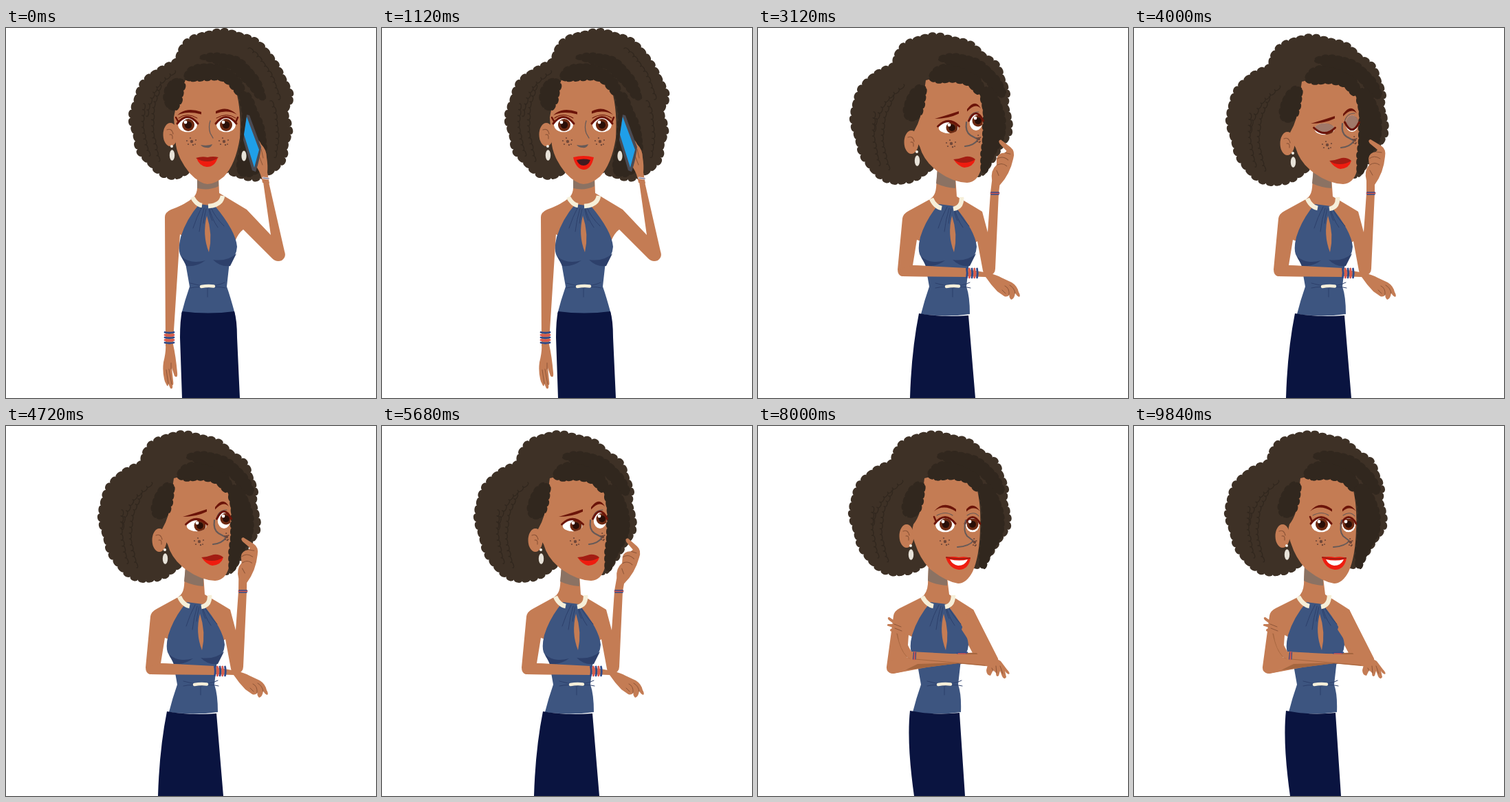
These frames come from a looping animation (538x538 px, 10 s). An HTML page:

```html
<!DOCTYPE html>
<html lang="en">
<head>
<meta charset="utf-8">
<title>Phone, think, smile</title>
<style>
html, body { margin: 0; width: 100%; height: 100%; overflow: hidden; background: #fff; }
svg { display: block; width: 100%; height: 100%; }
</style>
</head>
<body>
<svg id="stage" viewBox="0 0 538 538"></svg>
<script>
const NS = 'http://www.w3.org/2000/svg';
const C = {
  hair: '#3e3126', lock: '#31271e', skin: '#c47c54', crease: '#8d5538', shade: '#a5663f',
  dress: '#3d5580', fold: '#2d406b', skirt: '#0a1440', cream: '#f6efd9', gray: '#8b7263',
  brow: '#6b1409', iris: '#6d2a12', lid: '#a0796a', lip: '#ef1c0f', lipDark: '#a31d13',
  nose: '#665a58', pearl: '#e7e2d8', blue: '#2f4a8a', coral: '#d9564c'
};

// Shape helpers, each returning markup
const fill = (color, d) => `<path d="${d}" fill="${color}"/>`;
const line = (color, w, d) =>
  `<path d="${d}" fill="none" stroke="${color}" stroke-width="${w}" stroke-linecap="round" stroke-linejoin="round"/>`;
const dot = (color, x, y, rx, ry = rx) =>
  `<ellipse cx="${x}" cy="${y}" rx="${rx}" ry="${ry}" fill="${color}"/>`;
const group = (attrs, ...parts) => `<g ${attrs}>${parts.join('')}</g>`;

// Closed Catmull-Rom curve, always clockwise
function smooth(text) {
  const p = text.split(' ').map(s => s.split(',').map(Number));
  const n = p.length, at = i => p[(i + n) % n];
  const area = p.reduce((s, [x, y], i) => s + x * at(i + 1)[1] - at(i + 1)[0] * y, 0);
  if (area < 0) p.reverse();
  let d = 'M' + p[0];
  for (let i = 0; i < n; i++) {
    const [a, b, c, e] = [at(i - 1), at(i), at(i + 1), at(i + 2)];
    d += `C${b[0] + (c[0] - a[0]) / 6} ${b[1] + (c[1] - a[1]) / 6} ` +
         `${c[0] - (e[0] - b[0]) / 6} ${c[1] - (e[1] - b[1]) / 6} ${c}`;
  }
  return d;
}

// Rounded lobes along the left-hand side of a path
function lobes(d, step, height) {
  const path = document.createElementNS(NS, 'path');
  path.setAttribute('d', d);
  const len = path.getTotalLength(), n = Math.round(len / step);
  let a = path.getPointAtLength(0), out = `M${a.x} ${a.y}`;
  for (let i = 1; i <= n; i++) {
    const b = path.getPointAtLength(len * i / n);
    const k = height * (0.8 + 0.4 * Math.sin(i * 2.4) ** 2);
    const dx = b.x - a.x, dy = b.y - a.y;
    out += 'C' + [a.x + dy * k - dx * 0.15, a.y - dx * k - dy * 0.15,
      b.x + dy * k + dx * 0.3, b.y - dx * k + dy * 0.3, b.x, b.y].map(v => v.toFixed(1)).join(' ');
    a = b;
  }
  return out;
}
const mane = pts => fill(C.hair, lobes(smooth(pts), 11.5, 0.6));
const lock = pts => fill(C.lock, lobes(smooth(pts), 10, 0.45));
const strand = d => line(C.lock, 1.3, lobes(d, 9, 0.5));

// Face parts
const eyes = [];
function eye(x, y, rx, ry, ix, iy, r = 9) {
  const id = 'eye' + eyes.length;
  eyes.push({ id, x, y, rx, ry });
  return `<clipPath id="${id}c"><ellipse cx="${x}" cy="${y}" rx="${rx}" ry="${ry}"/></clipPath>` +
    group(`clip-path="url(#${id}c)"`,
      dot('#fff', x, y, rx, ry), dot(C.iris, ix, iy, r), dot('#2a0f08', ix, iy, r * 0.58),
      dot('#fff', ix - 4, iy - 4, 2.4), `<path id="${id}l" fill="${C.lid}"/>`) +
    `<path id="${id}s" fill="none" stroke="${C.brow}" stroke-width="3" stroke-linecap="round"/>`;
}
function setEye(i, shut) {
  const { id, x, y, rx, ry } = eyes[i];
  const arc = `${x - rx - 1} ${y - 2}Q${x} ${y - 2 + ry * 1.8 * (2 * shut - 1)} ${x + rx + 1} ${y - 2}`;
  document.getElementById(id + 's').setAttribute('d', 'M' + arc);
  document.getElementById(id + 'l').setAttribute('d', `M${arc}V${y - 30}H${x - rx - 1}Z`);
}
const brow = (x1, y1, cx, cy, x2, y2) =>
  fill(C.brow, `M${x1} ${y1}Q${cx} ${cy - 2} ${x2} ${y2}l0 3.5Q${cx} ${cy + 4} ${x1} ${y1}Z`);
const freckles = (x, y, s = 1) =>
  [[0, 0, 2.2], [-7, -1, 1.1], [-5, 4, 1.1], [-2, -5, 1.1], [2, 5, 1.2], [6, -2, 1.1], [5, 4, 1]]
    .map(([a, b, r]) => dot('#70483a', x + a * s, y + b, r)).join('');
const earring = (x, y) => dot('#f3efe6', x, y, 2) + dot(C.pearl, x + 0.5, y + 13, 3.7, 7.8);
const ear = (x, y) => dot(C.skin, x, y, 10.5, 17) +
  line(C.crease, 1.2, `M${x - 5} ${y - 7}q7 -3 9 6m-5 1q5 -1 4 6`);

// Dress shared by every pose; details sit slightly off when turned
function dress(dx, shift, hem) {
  return group(`transform="translate(${dx} 0)"`,
    fill(C.dress, `M281 256Q262 278 254 304Q250 320 253 329Q256 336 261 342L267 376Q260 396 255 416
      Q290 421 ${hem} 416Q326 390 321 376L325 340Q335 332 336 318Q334 295 304 259Z`),
    fill(C.fold, 'M255 332Q268 344 290 338Q276 348 262 346ZM335 328Q322 340 301 337Q312 348 326 346Z'),
    group(`transform="translate(${shift} 0)"`,
      line(C.fold, 1, `M285 260Q277 275 272 291M288 262Q283 278 281 296M291 263Q288 274 287 284
        M298 261Q304 275 317 288M296 263Q299 277 308 290M295 264Q297 275 300 280`),
      fill(C.skin, 'M292 273Q285 301 295 326Q301 300 292 273Z'),
      line(C.fold, 1, 'M268 371Q280 375 293 375Q308 375 318 370M268 378Q282 375 293 378Q308 375 319 378M293 379V391'),
      line(C.cream, 4.5, 'M284 376Q293 374.5 302 375.5')));
}
const collar = d => line(C.cream, 6.5, d).replaceAll('round', 'butt');
const bangles = (x, y, turn) => group(`transform="translate(${x} ${y}) rotate(${turn})"`,
  ...[-7.5, -3.7, 0, 3.7, 7.5].map((v, i) => line(i % 2 ? C.coral : C.blue, 2.8, `M-6.5 ${v}Q0 ${v + 1.5} 6.5 ${v}`)));

// Pose 1: on the phone
function phonePose() {
  const back = group('class="headA"',
    mane(`246,217 222,208 206,193 194,178 190,160 184,140 184,124 189,106 198,84 209,70 228,59 247,51 251,38 262,22
      282,11 305,7 325,6 347,13 368,23 383,39 390,52 402,70 409,86 414,104 406,120 410,140 412,155 406,170 404,188
      393,203 378,213 360,218 340,215 325,208 292,190 264,208`.replace(/\s+/g, ' ')),
    strand('M246 62Q208 82 204 128'), strand('M224 82Q200 132 222 194'), strand('M200 110Q192 150 208 186'),
    strand('M352 30Q386 58 396 104'), strand('M384 106Q398 140 390 188'));
  const body = [
    fill(C.skin, `M278 215H309L310 240Q330 252 350 264L385 301L374 224H382L405 325Q408 333 401 338Q393 341 387 335
      L345 293Q338 298 333 310L300 330L253 300L244 440L243 462H232L231 275Q231 268 240 264Q262 256 273 246Q278 240 278 232Z`),
    fill(C.gray, 'M278 218H309V230Q295 237 278 233Z'),
    fill(C.skin, `M232 460Q233 470 229 486Q227 500 231 514L234 520Q236 522 236 517L239 524Q243 526 242 519
      Q244 520 243 513L241 494L245 506Q250 510 249 501Q247 478 243 460Z`),
    line(C.crease, 1, 'M233 497L236 517M237 496L241 518M240 487V496'),
    dress(0, 0, 333), collar('M271 246Q277 257 285 258M294 259Q313 258 315 244'),
    fill(C.skirt, 'M256 412Q294 417 332 412Q336 425 336 450L340 538H256L253 450Q253 425 256 412Z'),
    bangles(237.5, 450, 0)].join('');
  const mouths = [
    fill(C.lip, 'M277 189Q292 193 308 188Q304 202 292 202Q281 201 277 189Z') +
      fill(C.lipDark, 'M276 189Q285 186 293 188Q301 186 309 188Q302 194 293 194Q283 194 276 189Z'),
    fill(C.lip, 'M274 188Q284 186 293 188Q303 186 313 188Q308 210 293 210Q279 208 274 188Z') +
      fill('#401b20', 'M279 191Q293 189 308 191Q304 204 293 204Q283 203 279 191Z') +
      fill('#fff', 'M280 191Q293 189 307 191Q304 198 293 198Q283 198 280 191Z'),
    fill(C.lip, 'M278 188Q293 184 308 188Q304 206 293 206Q282 205 278 188Z') +
      fill('#401b20', 'M283 192Q293 189 303 192Q300 200 293 200Q286 200 283 192Z')
  ].map(m => group('class="talk"', m)).join('');
  const head = group('class="headA"',
    ear(239, 155),
    fill(C.skin, 'M262 74Q292 66 330 78Q343 110 340 160Q334 198 317 216Q304 227 293 227Q281 226 267 211Q250 190 247 170L244 130Q250 95 262 74Z'),
    lock('258,78 245,75 235,86 232,105 238,117 247,118 253,105 256,90'),
    lock('260,72 268,60 290,54 320,60 341,80 345,102 336,94 325,80 305,73 285,74 270,76'),
    lock('282,43 310,39 340,47 363,71 376,100 371,104 355,85 330,60 300,47'),
    lock('342,95 352,97 364,122 376,160 372,200 358,212 338,210 343,170 346,130'),
    brow(249, 127, 262, 116, 284, 122), brow(336, 126, 322, 114, 305, 121),
    line(C.brow, 1, 'M251 131Q263 122 278 131M306 131Q321 122 334 131'),
    eye(264, 141, 14, 10.5, 265, 141), eye(320, 141, 14, 10.5, 320, 141),
    line(C.brow, 2.5, 'M251 137L247 130M334 137L337 130'),
    line(C.nose, 1.3, 'M297 135Q294 144 297 153L301 160'),
    fill(C.nose, 'M283 170Q292 172 300 169Q298 175 292 174Q286 174 283 170Z'),
    freckles(270, 165), freckles(317, 165), mouths,
    earring(241, 172), dot(C.pearl, 346, 186, 3.6, 7.5));
  const arm = group('id="phone"',
    fill(C.skin, 'M373 225Q371 212 365 203L363 168Q366 158 371 169Q379 177 379 188Q381 200 380 210L383 226Z'),
    line(C.crease, 1, 'M371 176L374 189M368 186L373 199'),
    fill('#4b4b53', 'M350 126L354 127L371 173Q369 192 363 209L358 207L345 163Z'),
    fill('#1f9fe9', 'M350 129L368 177L361 203L346 155Z'),
    line('#e8e4ea', 3, 'M374 218L382 219'), line('#645c78', 1.2, 'M374 218L382 219'));
  return back + body + head + arm;
}

// Hair and fringe for the two turned poses
const sideHair = () => [
  mane(`204,224 184,218 168,208 158,193 150,178 144,158 139,135 139,120 144,102 154,83 168,69 185,61 198,56 200,42
    213,26 232,16 255,12 284,16 312,26 329,41 346,53 354,70 362,96 358,108 364,125 364,155 356,168 343,185 332,203
    320,214 290,190 255,200 243,210 224,219`.replace(/\s+/g, ' ')),
  strand('M212 82Q170 110 168 150'), strand('M196 98Q166 150 190 206'), strand('M168 122Q162 164 176 200')].join('');
const sideFringe = () => [
  lock('243,84 231,87 218,102 214,124 222,134 234,129 239,112 242,97'),
  lock('250,72 262,58 288,54 314,64 326,86 321,96 312,88 304,80 285,76 264,78'),
  lock('263,44 290,40 319,48 343,67 359,95 357,101 340,85 315,63 285,52'),
  lock('326,90 339,90 352,112 358,150 347,174 334,200 326,212 328,170 330,130')].join('');

// Pose 2: thinking
function thinkPose() {
  return [
    group('class="headB"', sideHair()),
    fill(C.skin, `M261 205L287 215L289 245Q308 256 326 267L334 297L338 240H350L345 350Q345 358 335 361Q328 360 327 353
      L319 310L290 330L231 308L225 345L303 349V362L209 361Q203 359 203 351L210 277Q211 270 219 266L250 249Q258 244 259 232Z`),
    fill(C.gray, 'M261 205L287 218L287 233Q272 232 259 226Z'),
    dress(-18, 8, 326), collar('M252 248Q257 260 267 262M284 263Q297 261 296 246'),
    fill(C.skirt, 'M234 415Q268 421 306 418L316 538H221Q223 470 234 415Z'),
    fill(C.skin, 'M224 345L303 349V362L209 361L207 350Z'),
    group('id="rest"',
      fill(C.skin, `M300 350L334 356Q347 359 354 363L369 370Q377 375 379 384Q382 389 380 391Q376 390 374 385
        Q373 394 368 395Q364 391 366 387Q363 392 358 390L348 383Q339 374 331 362L300 361Z`),
      line(C.crease, 1, 'M359 375Q366 378 365 388M366 374Q373 378 374 386M355 381L360 386')),
    bangles(311, 356.5, -90),
    group('class="headB"',
      ear(223, 166),
      fill(C.skin, 'M244 76Q280 66 316 78Q328 105 328 140Q328 185 324 206Q319 224 304 225Q283 224 262 209Q241 194 235 172Q228 163 227 150Q238 132 240 104Z'),
      sideFringe(),
      group('id="browB"', brow(257, 132, 277, 128, 292, 121), brow(324, 117, 316, 104, 304, 118)),
      line(C.nose, 1.2, 'M306 136Q308 122 321 122'),
      eye(277, 145, 14.5, 8.5, 282, 145, 8.5), eye(317, 137, 9.5, 12, 320, 135, 8.5),
      line(C.nose, 2.2, 'M303 137Q301 151 309 156L320 162Q314 171 301 172'),
      freckles(281, 168), freckles(321, 161, 0.4),
      fill(C.lip, 'M285 192Q300 196 316 191Q313 202 300 203Q291 201 285 192Z'),
      fill(C.lipDark, 'M284 191Q294 190 302 187Q310 186 316 191Q309 196 299 196Q290 196 284 191Z'),
      earring(231, 180)),
    group('id="finger"',
      fill(C.skin, `M338 241L338 222Q334 208 342 199L341 190Q342 181 352 180L354 177L343 168Q339 163 344 162
        L359 171Q367 176 365 187Q363 210 350 228V241Z`),
      line(C.crease, 1, 'M352 180L360 181M342 190Q349 184 358 190M343 199Q350 194 357 199M343 207L347 214')),
    line(C.coral, 3, 'M339 240H350'), line(C.blue, 1.6, 'M339 239H350M339 242H350')
  ].join('');
}

// Pose 3: arms crossed
function crossPose() {
  return [
    group('class="headC"', group('transform="translate(-2 .4) scale(1 .957)"', sideHair())),
    fill(C.skin, `M248 203L275 220L278 245Q296 256 313 267L346 336L320 345L296 300L270 330L219 304L216 345L245 350L196 360
      Q186 359 187 350L197 276Q198 269 206 265L238 249Q246 243 247 230Z`),
    fill(C.gray, 'M248 203L275 220L275 232Q258 231 247 225Z'),
    dress(-30, 8, 325), collar('M239 248Q245 260 255 262M272 263Q284 261 284 246'),
    fill(C.skirt, 'M221 414Q256 421 293 417L301 538H227Q216 460 221 414Z'),
    group('id="arms"',
      fill(C.skin, 'M197 338L318 329L322 341L245 351L197 360Q187 360 188 350Z'),
      fill(C.shade, 'M232 346L300 344L245 351L214 355Z'),
      line(C.blue, 3, 'M290 330.5L304 330'), line(C.coral, 1.4, 'M291 331H302'),
      line(C.shade, 2, 'M304 331L321 331'),
      fill(C.skin, 'M306 266L313 267L349 338Q351 347 341 350L226 339Q220 337 222 328L320 333L296 296Z'),
      line(C.shade, 1, 'M228 339L330 348'),
      fill(C.shade, 'M205 296Q211 320 215 333L222 339Q208 334 201 300Z'),
      fill(C.skin, `M231 329L223 328Q214 313 212 301Q211 290 204 287L191 278Q187 278 190 282L198 288L189 288
        Q186 290 190 291L199 294L193 295Q190 298 195 299L203 302Q206 325 218 337L230 339Z`),
      line(C.crease, 1, 'M198 288L208 292M199 294L209 298'),
      line(C.coral, 2.6, 'M228 329L227 339'), line(C.blue, 1.2, 'M226.5 329L225.5 339M229.5 329L229 339'),
      fill(C.skin, `M336 340Q347 337 353 342L362 354Q367 359 365 361Q361 360 359 356L361 365Q358 370 355 364L352 356
        L350 363Q346 366 346 359L342 355L338 363Q332 362 332 355Z`),
      line(C.crease, 1, 'M346 349L347 359M352 349L356 360M340 352L342 356')),
    group('class="headC"',
      ear(216, 160),
      fill(C.skin, 'M242 76Q280 66 314 78Q325 105 323 150Q322 190 312 212Q303 229 291 229Q272 226 249 207Q235 192 228 170Q222 155 226 143Q238 128 239 100Z'),
      group('transform="translate(-2 0) scale(1 .985)"', sideFringe()),
      brow(256, 124, 270, 109, 288, 121), brow(323, 124, 313, 111, 303, 121),
      line(C.nose, 1.1, 'M260 130Q273 123 283 130M304 130Q314 123 321 131'),
      eye(272, 144, 14, 10.5, 273, 143), eye(312, 144, 10, 10.5, 312, 143, 8.5),
      line(C.brow, 2.5, 'M259 139L256 132'),
      line(C.nose, 2, 'M302 137Q298 153 304 160L313 167Q307 175 290 176'),
      freckles(272, 168), freckles(315, 169, 0.4),
      fill(C.lip, 'M273 191Q283 189 292 191Q301 189 309 192Q306 209 292 209Q278 207 273 191Z'),
      fill('#fff', 'M279 194Q293 197 305 194Q301 203 291 203Q283 202 279 194Z'),
      line(C.lipDark, 2, 'M274 191Q291 195 308 192'),
      earring(222, 174))
  ].join('');
}

const stage = document.getElementById('stage');
stage.innerHTML = [phonePose, thinkPose, crossPose].map(make => group('class="pose"', make())).join('');
const all = sel => [...stage.querySelectorAll(sel)];
const poses = all('.pose'), talk = all('.talk');
const move = (sel, value) => all(sel).forEach(n => n.setAttribute('transform', value));
const show = (list, index) => list.forEach((n, i) => n.setAttribute('display', i === index ? 'inline' : 'none'));

// Eased interpolation through [time, value] pairs
function keyed(t, keys) {
  if (t <= keys[0][0]) return keys[0][1];
  for (let i = 1; i < keys.length; i++) {
    const [t0, a] = keys[i - 1], [t1, b] = keys[i];
    if (t <= t1) {
      const u = (t - t0) / (t1 - t0);
      return a + (b - a) * u * u * (3 - 2 * u);
    }
  }
  return keys[keys.length - 1][1];
}

const LOOP = 10000, STEP = 80, SPEECH = '0121021201021121020';
function draw(ms) {
  const t = Math.floor(ms % LOOP / STEP) * STEP;
  const pose = t < 3000 ? 0 : t < 7000 ? 1 : 2;
  const sway = Math.sin(t / 2160 * Math.PI * 2);
  show(poses, pose);
  if (pose === 0) {
    show(talk, +SPEECH[Math.floor(t / 160)]);
    move('.headA', `rotate(${0.25 * sway} 293 230)`);
    move('#phone', `rotate(${0.25 * sway} 378 225)`);
    setEye(0, 0);
    setEye(1, 0);
  } else if (pose === 1) {
    const bow = keyed(t, [[3000, 0], [3700, 0], [3960, 1], [4240, 1], [4560, 0]]);
    const wink = keyed(t, [[6640, 0], [6800, 1]]);
    move('.headB', `translate(0 ${2 * bow - wink})`);
    move('#browB', `translate(0 ${5 * bow - 2 * wink})`);
    move('#finger', `rotate(${keyed(t, [[3000, 8], [3500, 0], [4600, 0], [5300, 10], [5900, 10], [6600, -4], [7000, -5]])} 344 240)`);
    setEye(2, Math.max(bow, 0.45 * wink));
    setEye(3, Math.max(bow, 0.12 * wink));
  } else {
    const blink = keyed(t, [[8320, 0], [8440, 1], [8520, 1], [8640, 0]]);
    const settle = keyed(t, [[7000, 1], [7600, 0]]);
    move('.headC', `translate(0 ${1.5 * settle})`);
    move('#arms', `translate(0 ${1.5 * settle})`);
    setEye(4, blink);
    setEye(5, blink);
  }
}

const start = performance.now();
function tick() {
  draw(performance.now() - start);
  requestAnimationFrame(tick);
}
draw(0);
requestAnimationFrame(tick);
</script>
</body>
</html>
```
